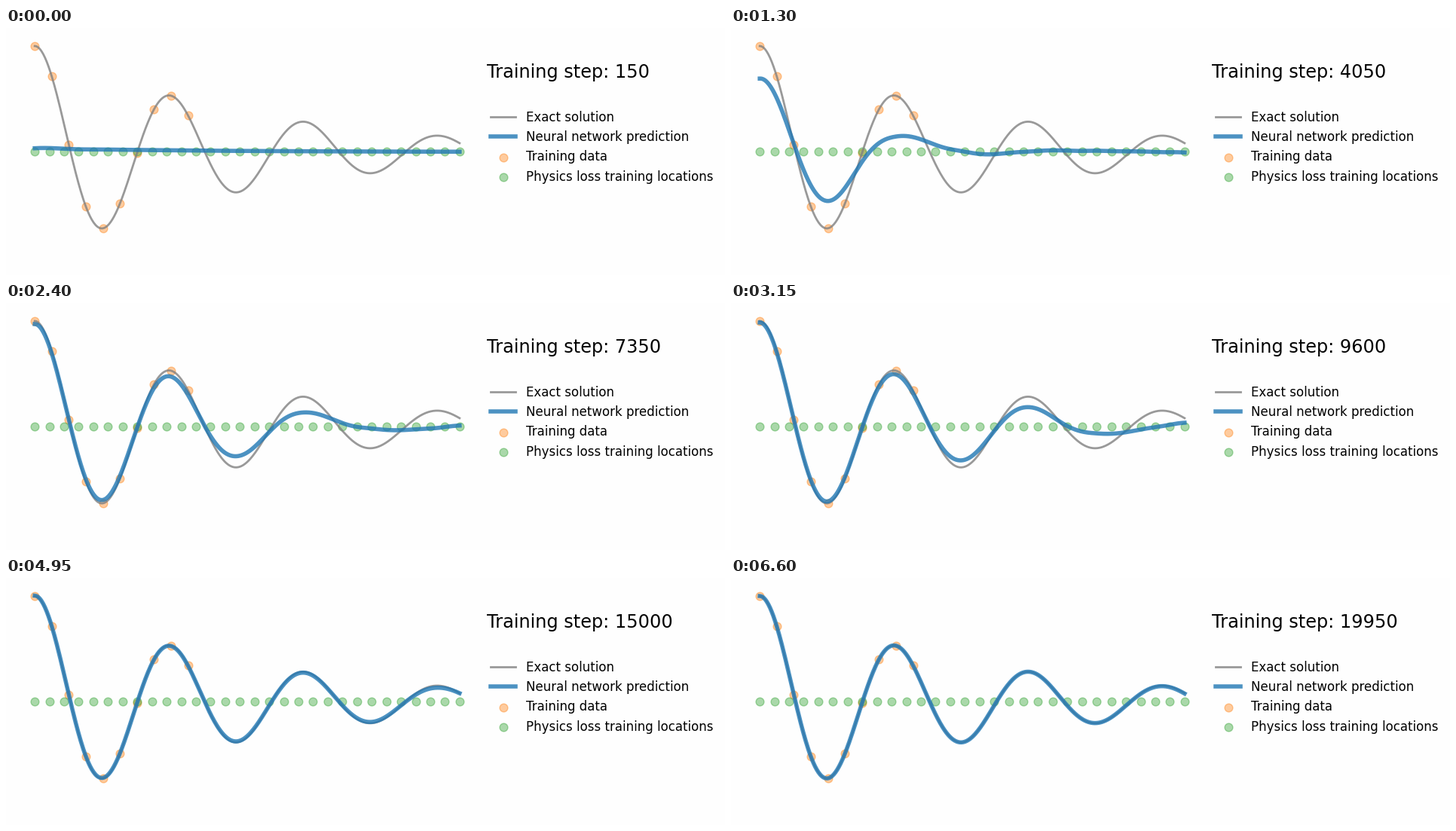
Animation, 954 px wide and 328 px high, one loop 6650 ms. Source, as a matplotlib script:

```python
import numpy as np
import matplotlib.pyplot as plt
from matplotlib.animation import FuncAnimation

W, H, DPI = 954, 328, 100
FRAMES, INTERVAL = 133, 50
STEPS_PER_FRAME = 150
UNIT = 140  # pixels per unit of height

# Underdamped oscillator
DAMP, OMEGA0 = 2, 20
OMEGA = np.sqrt(OMEGA0**2 - DAMP**2)
PHASE = np.arctan(-DAMP / OMEGA)


def exact(x):
    return np.exp(-DAMP * x) * np.cos(PHASE + OMEGA * x) / np.cos(PHASE)


def spline_basis(knots, x):
    """Matrix that maps knot values to a natural cubic spline at x."""
    n = len(knots)
    h = np.diff(knots)
    lhs, rhs = np.eye(n), np.zeros((n, n))
    for i in range(1, n - 1):
        lhs[i, i - 1:i + 2] = h[i - 1], 2 * (h[i - 1] + h[i]), h[i]
        rhs[i, i - 1:i + 2] = 6 / h[i - 1], -6 / h[i - 1] - 6 / h[i], 6 / h[i]
    curv = np.linalg.solve(lhs, rhs)
    k = np.clip(np.searchsorted(knots, x) - 1, 0, n - 2)
    hk = h[k][:, None]
    b = (x - knots[k])[:, None] / hk
    a = 1 - b
    eye = np.eye(n)
    bend = (a**3 - a) * curv[k] + (b**3 - b) * curv[k + 1]
    return a * eye[k] + b * eye[k + 1] + bend * hk**2 / 6


def monotone(t, times, rows):
    """Monotone cubic interpolation of each column of rows at time t."""
    h = np.diff(times)[:, None]
    s = np.diff(rows, axis=0) / h
    prod, total = s[:-1] * s[1:], s[:-1] + s[1:]
    rising = prod > 0
    inner = np.where(rising, 2 * prod / np.where(rising, total, 1), 0)
    d = np.vstack([s[:1], inner, s[-1:] * 0.5])
    k = int(np.clip(np.searchsorted(times, t) - 1, 0, len(times) - 2))
    w = h[k, 0]
    u = (t - times[k]) / w
    return ((1 + 2 * u) * (1 - u)**2 * rows[k] + u * (1 - u)**2 * w * d[k]
            + u * u * (3 - 2 * u) * rows[k + 1] - u * u * (1 - u) * w * d[k + 1])


x = np.linspace(0, 1, 500)
y = exact(x)

# Knots at every peak, trough and midpoint of the oscillation
knots = np.append(np.arange(13) * np.pi / OMEGA / 2, 1)
ref = exact(knots)

# Learned heights in pixels at the knots, by training step
learned = {
    3000: [14, 2.5, -3, -3.7, -1.8, .8, 2.5, 3, 2.5, 1.7, .7, -.3, -1.2, -1.8],
    3600: [52, 9, -30, -22, -3, 7, 7, 4, 1.5, .5, 0, -.3, -.8, -1.2],
    4350: [117, 13, -82, -13, 37, 15, -6, -8, -1, 2.5, 2, .5, -1, -1.5],
    5400: [131.5, 11, -93, -8, 61.5, 6.5, -29.3, -9, 7.5, 7.7, 4.2, 0, -2, -2],
    7200: [135.8, 12, -97.5, -8.3, 66.5, 6, -39, -7, 18, 7.5, -2, -4.5, -2, 1],
    9600: [138, 12, -99.5, -8.5, 69.5, 6, -45, -5.5, 25.7, 5, -9, -7, .5, 5],
    12150: [139.5, 12, -100.5, -8.8, 72, 6.2, -49.5, -5, 32.2, 4, -17.5, -3.5, 7.3, 7],
    15000: [140.5, 12, -101.5, -8.8, 74, 6.3, -53, -4.7, 38.3, 3.5, -27.2, -2.5, 18.3, 11],
}
first = 5 * np.exp(-2.5 * knots) - 0.7
last = UNIT * ref * (1 - 0.05 * knots**8)
times = np.array([STEPS_PER_FRAME, *learned, FRAMES * STEPS_PER_FRAME], float)
rows = np.vstack([first, *learned.values(), last])

# Spline the departure from a scaled exact solution
basis = spline_basis(knots, x)
basis[:, 0] += y - basis @ ref


def predict(step):
    return basis @ monotone(step, times, rows) / UNIT


plt.rcParams["font.family"] = "DejaVu Sans"
# The small margin keeps the pixel size from rounding down
fig = plt.figure(figsize=((W + 0.01) / DPI, (H + 0.01) / DPI), dpi=DPI,
                 facecolor="#fefefe")
ax = fig.add_axes([10 / W, 10 / H, 620 / W, 308 / H])
ax.set_xlim(-0.05, 1.05)
ax.set_ylim(-1.1, 1.1)
ax.axis("off")

ax.plot(x, y, color="grey", lw=2, alpha=0.8, label="Exact solution")
pred, = ax.plot(x, predict(STEPS_PER_FRAME), color="tab:blue", lw=4, alpha=0.8,
                label="Neural network prediction")
ax.scatter(x[0:200:20], y[0:200:20], s=60, color="tab:orange", alpha=0.4,
           label="Training data")
ax.scatter(np.linspace(0, 1, 30), np.zeros(30), s=60, color="tab:green", alpha=0.4,
           label="Physics loss training locations")
ax.legend(loc=(1.01, 0.34), frameon=False, fontsize="large")
title = ax.text(1.065, 0.7, "", fontsize="xx-large", color="k")


def update(i):
    step = STEPS_PER_FRAME * (i + 1)
    pred.set_ydata(predict(step))
    title.set_text(f"Training step: {step}")
    return pred, title


anim = FuncAnimation(fig, update, frames=FRAMES, interval=INTERVAL,
                     repeat=True, repeat_delay=0)
plt.show()
```
